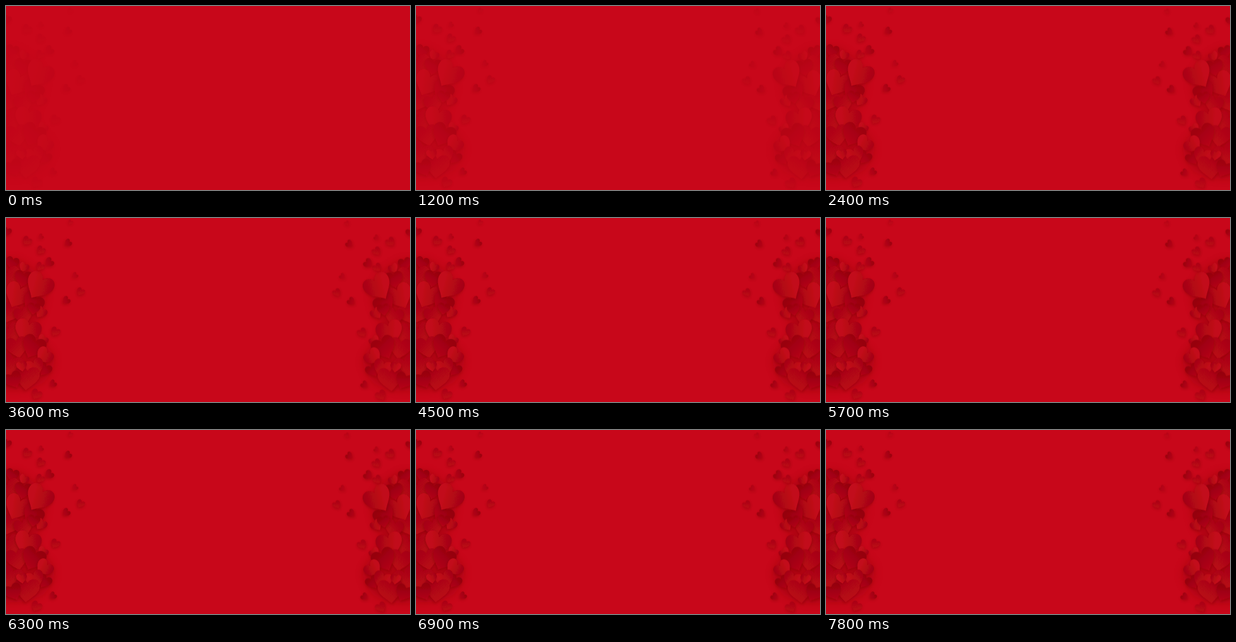
Animation of 640 by 294 pixels, one loop 8000 ms. Source, as an HTML page:

```html
<!DOCTYPE html>
<html lang="en">
<head>
<meta charset="utf-8">
<title>Hearts on red</title>
<style>
  html, body { margin: 0; width: 100%; height: 100%; overflow: hidden; background: #c8071a; }
  svg { display: block; width: 100%; height: 100%; }
  .side { animation: appear 8s infinite; }
  .left { --from: .17; }
  .right { --from: 0; }
  /* Each step lasts 300 ms */
  @keyframes appear {
    0% { opacity: var(--from); animation-timing-function: steps(8, end); }
    30% { opacity: .8; animation-timing-function: steps(8, end); }
    60% { opacity: .96; animation-timing-function: steps(8, end); }
    90%, 100% { opacity: 1; }
  }
</style>
</head>
<body>
<svg viewBox="0 0 640 294" preserveAspectRatio="none">
  <defs>
    <linearGradient id="deep" x1="0" y1="1" x2=".4" y2="0">
      <stop offset="0" stop-color="#b90717"/><stop offset="1" stop-color="#960410"/>
    </linearGradient>
    <linearGradient id="mid" x1="0" y1="0" x2=".8" y2="1">
      <stop offset="0" stop-color="#a30512"/><stop offset="1" stop-color="#bd0818"/>
    </linearGradient>
    <linearGradient id="bright" x1="0" y1=".6" x2="1" y2=".3">
      <stop offset=".3" stop-color="#c2091a"/><stop offset="1" stop-color="#a20512"/>
    </linearGradient>
    <filter id="shadow" x="-40%" y="-40%" width="180%" height="180%">
      <feDropShadow dx="-1" dy="2" stdDeviation="2" flood-color="#75000a" flood-opacity=".42"/>
    </filter>
    <filter id="blur" x="-50%" y="-20%" width="200%" height="140%">
      <feGaussianBlur stdDeviation="7"/>
    </filter>
    <path id="heart" d="M0 .5C-.16 .3-.5 .12-.5-.17C-.5-.52-.1-.56 0-.26C.1-.56 .5-.52 .5-.17C.5 .12 .16 .3 0 .5Z"/>
    <g id="hearts">
      <path d="M-20 66H18Q58 88 62 112T52 160T64 205T60 262Q28 282-20 272Z"
            fill="#9c0511" opacity=".55" filter="url(#blur)"/>
    </g>
  </defs>
  <g class="side left"><use href="#hearts"/></g>
  <g class="side right"><use href="#hearts" transform="translate(642 1.5) scale(-1 1)"/></g>
</svg>
<script>
  const group = document.getElementById('hearts');

  function addHeart(x, y, size, turn, fill, opacity = 1) {
    const node = document.createElementNS('http://www.w3.org/2000/svg', 'g');
    node.setAttribute('filter', 'url(#shadow)');
    node.setAttribute('opacity', opacity);
    node.innerHTML = `<use href="#heart" fill="url(#${fill})"
      transform="translate(${x} ${y}) rotate(${turn}) scale(${size})"/>`;
    group.append(node);
  }

  // x, y, width, rotation; back to front
  const cluster = [
    [10, 72, 21, 15], [28, 79, 16, 30], [6, 98, 40, -20], [27, 97, 28, 10],
    [18, 124, 42, 25], [6, 152, 32, 20], [42, 135, 34, 40], [55, 151, 19, 35],
    [28, 156, 30, -15], [44, 145, 20, 10], [52, 109, 44, 32], [8, 186, 36, -25],
    [34, 182, 42, 15], [58, 195, 17, 40], [18, 207, 36, -10], [43, 206, 38, 25],
    [60, 221, 28, 42], [8, 236, 38, 20], [61, 242, 22, 30], [46, 239, 30, -20],
    [33, 256, 40, 5], [12, 259, 28, -25], [25, 237, 17, -10]
  ];
  const tones = ['deep', 'mid', 'bright'];
  cluster.forEach(([x, y, size, turn], i) =>
    addHeart(x, y, size, turn, size > 40 || i === 22 ? 'bright' : tones[i * 2 % 3]));

  // x, y, width
  const loose = [
    [1, 22, 15], [33, 37, 15], [55, 30, 9], [55, 52, 14], [68, 71, 15],
    [54, 78, 14], [98, 40, 12], [102, 7, 8], [109, 92, 10], [118, 118, 13],
    [95, 132, 13], [78, 182, 15], [74, 265, 12], [48, 282, 17]
  ];
  loose.forEach(([x, y, size], i) =>
    addHeart(x, y, size, 20 + i * 17 % 35, tones[i % 2], size < 11 ? .5 : .85));
</script>
</body>
</html>
```
